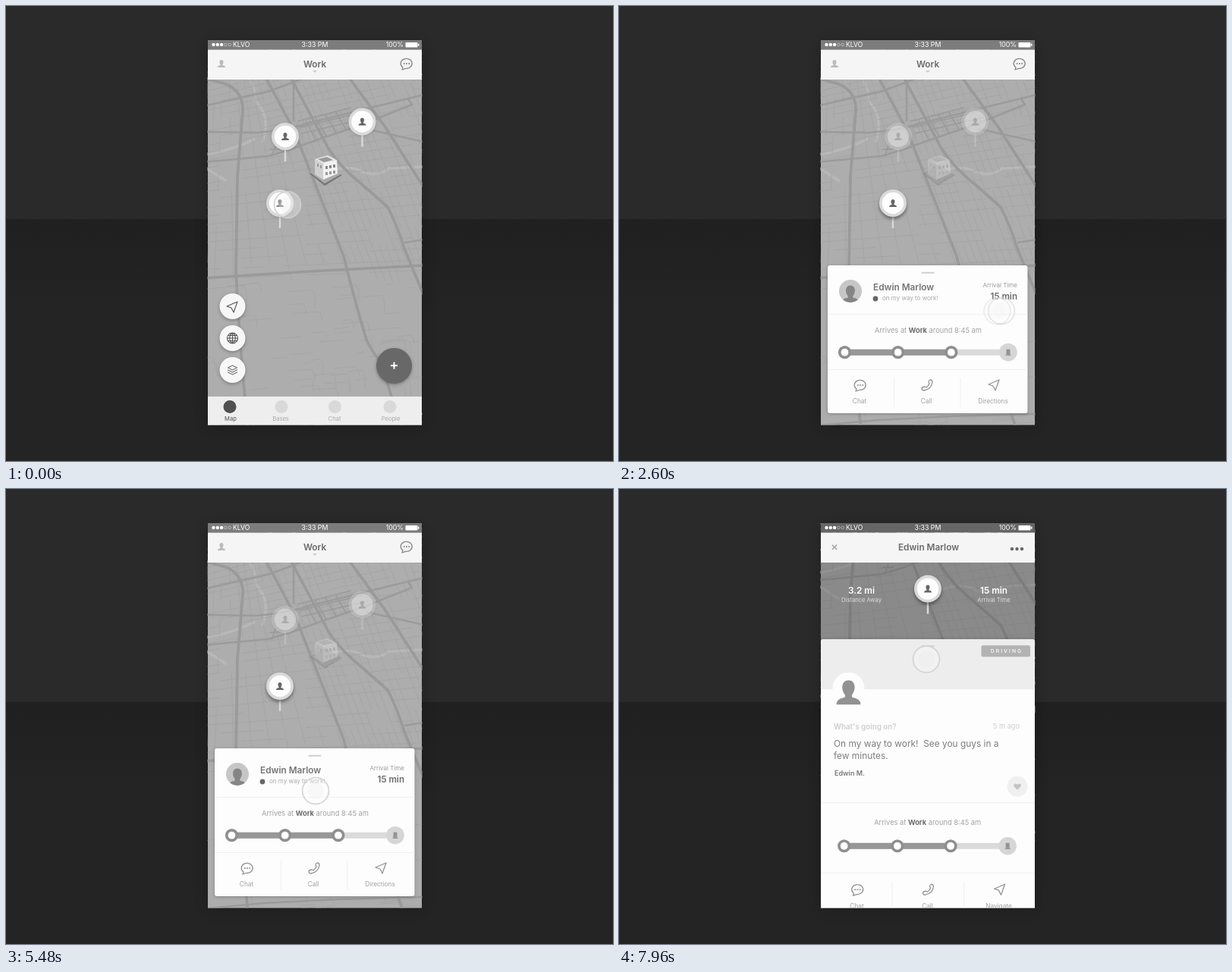
Write an HTML page with a canvas that moves like this. It is 800 px wide and 600 px high and loops after 8 s.

```html
<!DOCTYPE html>
<html lang="en">
<head>
<meta charset="utf-8">
<title>Map app</title>
<style>
html, body { margin: 0; width: 100%; height: 100%; overflow: hidden; background: #242424; }
canvas { display: block; }
</style>
</head>
<body>
<canvas id="stage" width="800" height="600"></canvas>
<script>
const LOOP = 8000, STEP = 40, TAU = Math.PI * 2;
const NAME = 'Edwin Marlow';
const stage = document.getElementById('stage').getContext('2d');
const layer = document.createElement('canvas');
layer.width = 800; layer.height = 600;
const next = layer.getContext('2d');
let g = stage;

// Timing helpers
const clamp = v => Math.max(0, Math.min(1, v));
const mix = (a, b, k) => a + (b - a) * k;
const outQuad = k => 1 - (1 - k) ** 2;
const outCubic = k => 1 - (1 - k) ** 3;
const smooth = k => k * k * (3 - 2 * k);
const ramp = (t, a, b, ease = smooth) => ease(clamp((t - a) / (b - a)));
const gray = v => { v = Math.round(v); return `rgb(${v},${v},${v})`; };
function track(t, keys, ease = smooth) {
  let i = 1;
  while (i < keys.length - 1 && t > keys[i][0]) i++;
  const [a, b] = [keys[i - 1], keys[i]];
  return mix(a[1], b[1], ramp(t, a[0], b[0], ease));
}

// Drawing helpers
function disc(x, y, r, fill) {
  g.fillStyle = fill; g.beginPath(); g.arc(x, y, r, 0, TAU); g.fill();
}
function ring(x, y, r, color, w) {
  g.strokeStyle = color; g.lineWidth = w; g.beginPath(); g.arc(x, y, r, 0, TAU); g.stroke();
}
function rect(x, y, w, h, fill) { g.fillStyle = fill; g.fillRect(x, y, w, h); }
function round(x, y, w, h, r, fill) {
  g.fillStyle = fill; g.beginPath(); g.roundRect(x, y, w, h, r); g.fill();
}
function poly(pts, fill) {
  g.fillStyle = fill; g.beginPath(); pts.forEach(p => g.lineTo(...p)); g.closePath(); g.fill();
}
function text(s, x, y, size, color, align = 'left', weight = 400) {
  g.font = `${weight} ${size}px Inter, Roboto, sans-serif`;
  g.textAlign = align; g.textBaseline = 'middle'; g.fillStyle = color;
  g.fillText(s, x, y);
}
function shape(d, x, y, color, w) {
  g.save(); g.translate(x, y);
  if (w) { g.strokeStyle = color; g.lineWidth = w; g.lineJoin = g.lineCap = 'round'; g.stroke(d); }
  else { g.fillStyle = color; g.fill(d); }
  g.restore();
}
function shadow(color, blur, dy) { g.shadowColor = color; g.shadowBlur = blur; g.shadowOffsetY = dy; }
function noShadow() { g.shadowColor = 'transparent'; }
function fade(a, draw) {
  if (a <= 0.005) return;
  g.save(); g.globalAlpha *= a; draw(); g.restore();
}
function shifted(x, y, draw) { g.save(); g.translate(x, y); draw(); g.restore(); }

const ICON = {
  arrow: new Path2D('M7-7L-7-1L-1 1L2 7Z'),
  phone: new Path2D('M4-7Q7-7 7-4Q6 5-4 7Q-7 7-7 4Q-6 2-3 2L-1 3Q2 1 3-2L2-4Q2-6 4-7Z'),
  bubble: new Path2D('M-5 5A7.5 6.5 0 1 1-1 6.4L-6 8Z'),
  heart: new Path2D('M0 4.5L-4.5 0Q-5.5-3-2.6-3.8Q-.8-4 0-2.2Q.8-4 2.6-3.8Q5.5-3 4.5 0Z'),
  person: new Path2D('M0-5C3-5 3.2-1 1.4 1L1.5 2Q5 2.5 5 5H-5Q-5 2.5-1.5 2L-1.4 1C-3.2-1-3-5 0-5Z'),
  globe: new Path2D('M-7 0A7 7 0 1 1 7 0A7 7 0 1 1-7 0H7M0-7V7M0-7C-5-4-5 4 0 7C5 4 5-4 0-7M-6-3.5H6M-6 3.5H6'),
  layers: new Path2D('M0-6L6-3L0 0L-6-3ZM-6 0L0 3L6 0M-6 3L0 6L6 3')
};
function person(x, y, k, color) { shifted(x, y, () => { g.scale(k, k); shape(ICON.person, 0, 0, color); }); }
function chat(x, y, color) {
  shape(ICON.bubble, x, y, color, 1.3);
  for (const d of [-3.2, 0, 3.2]) disc(x + d, y, 1.1, color);
}

// Street map
let seed = 7;
const rnd = () => (seed = (seed * 16807) % 2147483647) / 2147483647;
const streets = new Path2D();
function street(x1, y1, x2, y2) { streets.moveTo(x1, y1); streets.lineTo(x2, y2); }
for (let y = 70; y < 360; y += 7 + y / 60) {
  const slope = -0.26 + clamp((y - 90) / 260) * 0.22;
  for (let x = 255; x < 550; x += 28)
    if (rnd() < 0.72) street(x, y + (x - 300) * slope, x + 28, y + (x - 272) * slope);
}
for (let k = -10; k < 34; k++) {
  const lean = clamp((k - 2) / 7) * 0.42 - 0.04;
  for (let y = 75; y < 350; y += 24) {
    const x = 266 + k * 9.5 + (y - 97) * lean;
    if (rnd() < 0.68) street(x, y, x + 24 * lean, y + 24);
  }
}
for (let i = 0; i < 75; i++) {
  const x = 262 + rnd() * 280, y = 365 + rnd() * 190, w = 8 + rnd() * 26, h = 8 + rnd() * 18;
  streets.moveTo(x, y); streets.lineTo(x + w, y - 2);
  if (rnd() < 0.6) streets.quadraticCurveTo(x + w + 5, y + 2, x + w + 4, y + h);
}
for (let i = 0; i < 10; i++) street(384 + i * 7, 151 - i * 1.8, 394 + i * 7, 180 - i * 2.4);
const block = new Path2D('M384 152L455 134M387 160L470 140M390 168L480 147M395 151L408 176M408 147L422 172M421 143L435 168M435 140L448 163M348 189H362M355 184L350 199');
const roads = new Path2D('M258 94L290 103Q313 113 312 138L305 225L303 350Q308 450 319 560M332 75L380 165L445 330Q460 390 475 440Q482 455 494 470L508 515L525 560M365 75L425 188Q440 212 470 236L503 265Q516 290 525 320L550 380M438 75L500 160L550 238M260 359L400 350L550 342');
const lanes = new Path2D('M260 132L345 113L420 85M260 166L330 167Q370 164 400 154L550 117M260 206L345 198Q375 190 400 180L470 156L535 130L530 123M379 85V152M525 312L550 308M474 162L550 179M266 553L340 546L440 541L550 538');
const rivers = new Path2D('M318 92Q330 108 328 125Q350 145 338 180M262 196Q300 190 328 175M264 214L291 231M426 218Q450 210 464 216Q488 228 505 214L550 212');
function line(path, color, w) { g.strokeStyle = color; g.lineWidth = w; g.lineJoin = 'round'; g.stroke(path); }
function map(shift, dark) {
  rect(266, 97, 282, 456, '#adadad');
  shifted(0, shift, () => {
    line(rivers, '#b8b8b8', 3.4);
    line(streets, '#a2a2a2', 0.7);
    line(block, '#9a9a9a', 1.6);
    line(lanes, '#9b9b9b', 2.5);
    line(roads, '#9a9a9a', 3.7);
  });
  rect(266, 97, 282, 456, `rgba(45,45,48,${0.29 * dark})`);
}
function building() {
  poly([[400, 221], [421, 209], [443, 223], [420, 237]], '#777');
  poly([[400, 219], [421, 207], [443, 221], [420, 234]], '#aaa');
  poly([[407, 202], [418, 207], [418, 229], [407, 222]], '#cfcfcf');
  poly([[418, 207], [436, 203], [437, 221], [418, 229]], '#f1f1f1');
  poly([[407, 202], [424, 197], [436, 203], [418, 208]], '#e6e6e6');
  poly([[411, 202], [423, 199], [431, 203], [419, 206]], '#999');
  for (let i = 0; i < 3; i++) {
    rect(421 + i * 5, 211 - i, 3, 4, '#888');
    rect(421 + i * 5, 219 - i, 3, 4, '#999');
  }
  rect(410, 208, 2, 4, '#999'); rect(414, 210, 2, 4, '#999');
}
function pin(x, y, a, lit) {
  fade(a, () => {
    rect(x - 1.2, y + 16, 2.4, 17, '#dadada');
    shadow(`rgba(0,0,0,${0.15 + 0.25 * lit})`, 4, 1 + 2 * lit);
    disc(x, y, 18, '#dadada');
    noShadow();
    disc(x, y, 14.2, '#fdfdfd');
    person(x, y, 1, '#666');
  });
}

// Interface pieces
function controls(a) {
  fade(a, () => {
    shadow('rgba(0,0,0,.3)', 4, 1.5);
    for (const y of [396, 438, 480]) disc(298.5, y, 17, '#f7f7f7');
    disc(511.5, 474.5, 23.5, '#686868');
    noShadow();
    shape(ICON.arrow, 298, 397, '#555', 1.1);
    shape(ICON.globe, 298.5, 438, '#555', 1.1);
    shape(ICON.layers, 298.5, 480, '#777', 1.2);
    rect(507, 473.2, 9, 2, '#fff'); rect(510.5, 469.7, 2, 9, '#fff');
  });
}
function tabs(drop) {
  if (drop >= 38) return;
  shifted(0, drop, () => {
    rect(266, 515, 282, 40, '#eee');
    ['Map', 'Bases', 'Chat', 'People'].forEach((s, i) => {
      disc([295, 363, 433.5, 506][i], 528.5, 8.5, i ? '#d9d9d9' : '#505050');
      text(s, [296, 362, 433, 507][i], 545, 7.6, i ? '#aaa' : '#555', 'center');
    });
  });
}
function header(p) {
  rect(266, 45, 282, 12.5, gray(mix(124, 101, p)));
  for (let i = 0; i < 5; i++)
    i < 3 ? disc(273.5 + i * 5.3, 51, 2.2, '#fff') : ring(273.5 + i * 5.3, 51, 1.8, 'rgba(255,255,255,.6)', 0.7);
  text('KLVO', 299, 51.3, 8.6, '#fff');
  text('3:33 PM', 407, 51.3, 8.8, '#fff', 'center');
  text('100%', 524, 51.3, 8.8, '#fff', 'right');
  round(526.5, 48, 16, 6.5, 1, '#fff'); rect(543, 49.7, 1.5, 3, '#fff');
  rect(266, 57.5, 282, 39.5, '#f5f5f5');
  const q = clamp(p / 0.88);
  fade(1 - q, () => {
    person(284, 76, 1, '#bbb');
    text('Work', 407, 77.5, 11.8, '#6a6a6a', 'center', 600);
    poly([[404, 85], [410, 85], [407, 88]], '#ccc');
    chat(528, 76, '#888');
  });
  fade(q, () => {
    text('×', 284, 76.5, 15, '#aaa', 'center', 600);
    text(NAME, 408, 77.5, 11.8, '#6a6a6a', 'center', 600);
    for (const x of [518, 524.5, 531]) disc(x, 79, 2.2, '#666');
  });
}
function avatar(x, y, r, bg, color) {
  disc(x, y, r, bg);
  g.save(); g.beginPath(); g.arc(x, y, r, 0, TAU); g.clip();
  person(x, y + r * 0.27, r * 0.155, color);
  g.restore();
}
function actions(xs, y, labels, divs, h) {
  chat(xs[0], y, '#929292');
  shape(ICON.phone, xs[1], y, '#929292', 1.3);
  shape(ICON.arrow, xs[2], y, '#929292', 1.3);
  labels.forEach((s, i) => text(s, xs[i] - 1, y + 22, 8.3, '#a0a0a0', 'center'));
  for (const x of divs) rect(x, y - 10, 1, h, '#f0f0f0');
}
function arrives(y) {
  const parts = [['Arrives at ', 400, '#a2a2a2'], ['Work', 700, '#6c6c6c'], [' around 8:45 am', 400, '#a2a2a2']];
  let x = 337;
  for (const [s, weight, color] of parts) {
    text(s, x, y, 9.3, color, 'left', weight);
    x += g.measureText(s).width;
  }
}
function goal(x, y) {
  disc(x, y, 11.8, '#d6d6d6');
  rect(x - 2.5, y - 4, 5, 7, '#939393'); rect(x - 3.5, y + 3, 7, 1.3, '#939393');
}
function stops(y, k) {
  if (k <= 0) return;
  fade(clamp(k * 3), () => {
    round(297, y - 4, 216, 8, 4, '#dadada');
    round(297, y - 4, 141 * k, 8, 4, '#979797');
    [0, 0.5, 1].forEach((at, i) => {
      const s = clamp((k - at * 0.8) * 5);
      disc(297.5 + i * 70.2, y, 8.6 * s, '#8f8f8f');
      disc(297.5 + i * 70.2, y, 4.9 * s, '#fff');
    });
    goal(513, y);
  });
}
function card(grow, eta) {
  shadow('rgba(0,0,0,.25)', 4, 1);
  round(275, 342, 263.5, 195, 3, '#fdfdfd');
  noShadow();
  round(398.5, 350.8, 17, 2, 1, '#cfcfcf');
  avatar(305, 376, 15, eta ? '#d8d8d8' : '#c6c6c6', '#858585');
  text(NAME, 335, 371, 11.8, '#747474', 'left', 600);
  disc(338, 386, 3.4, '#666');
  text('on my way to work!', 347, 386, 8, '#aaa');
  text(eta ? 'ETA' : 'Arrival Time', 525, 368.5, 8, '#9b9b9b', 'right');
  text('15 min', 525, 384, 11.6, '#6c6c6c', 'right', 600);
  rect(275, 406, 263.5, 1, '#f1f1f1');
  if (eta) {
    round(298, 435, 216, 8, 4, '#dadada');
    round(298, 435, 134.5 * grow, 8, 4, '#939393');
    disc(298.5, 439, 8.8, '#787878');
    poly([[294, 439], [298.5, 434.5], [303, 439], [301.5, 439], [301.5, 443], [295.5, 443], [295.5, 439]], '#c4c4c4');
    goal(513.5, 439);
    text('Arrive around 8:45 am', 407, 460, 8.2, '#9b9b9b', 'center');
  } else {
    arrives(428);
    stops(456.7, grow);
  }
  rect(275, 479, 263.5, 1, '#f1f1f1');
  actions([318, 406, 494], 500, ['Chat', 'Call', 'Directions'], [362, 449.5], 39);
}
function sheet(top) {
  shifted(0, top, () => {
    shadow('rgba(0,0,0,.25)', 4, 0);
    round(266, 0, 282, 400, [3, 3, 0, 0], '#fdfdfd');
    noShadow();
    round(266, 0, 282, 66, [3, 3, 0, 0], '#ededed');
    round(398.5, 8, 17, 1.8, 1, '#cfcfcf');
    round(477.5, 8, 64.5, 15, 2, '#b3b3b3');
    g.letterSpacing = '2px';
    text('DRIVING', 511, 16, 6.8, '#f4f4f4', 'center', 600);
    g.letterSpacing = '0px';
    disc(302.5, 64.5, 21, '#fdfdfd');
    person(302.5, 70, 3.2, '#929292');
    text("What's going on?", 283, 116, 9.8, '#cecece', 'left', 600);
    text('5 m ago', 528, 115, 9.2, '#cecece', 'right');
    text('On my way to work!  See you guys in a', 283, 138, 11.9, '#7c7c7c');
    text('few minutes.', 283, 154, 11.9, '#7c7c7c');
    text('Edwin M.', 284, 177, 9, '#777', 'left', 600);
    disc(525, 194, 13.5, '#f0f0f0');
    shape(ICON.heart, 525, 194, '#c4c4c4');
    rect(266, 215, 282, 1, '#f1f1f1');
    shifted(-0.8, 0, () => { arrives(242); stops(272.5, 1); });
    rect(266, 307.5, 282, 1, '#f1f1f1');
    actions([314.5, 407.5, 501.5], 330, ['Chat', 'Call', 'Navigate'], [359.5, 454], 50);
  });
}
function stats(p) {
  const d = Math.max(0, 0.95 - p);
  fade(clamp((p - 0.55) / 0.38), () => {
    [['3.2 mi', 'Distance Away', 319.5 + d * 84], ['15 min', 'Arrival Time', 494 - d * 76]].forEach(([a, b, x]) => {
      text(a, x, 134.5 + d * 75, 11.8, '#fff', 'center', 600);
      text(b, x, 147 + d * 62, 7.6, '#ddd', 'center');
    });
  });
}
function touch(t) {
  const x = track(t, [[0, 371], [900, 364], [1500, 364], [1700, 504], [2600, 504], [3000, 308], [3700, 308], [4320, 519], [4700, 519], [4900, 408], [5500, 408], [6100, 411], [6700, 411], [7000, 405]]);
  const y = track(t, [[0, 262], [1500, 263], [1700, 402], [2600, 402], [3000, 414], [3700, 414], [4320, 412], [4700, 412], [4900, 398], [5650, 398], [6060, 338], [6700, 338], [7000, 206], [7660, 206], [7960, 224.5]]);
  const a = track(t, [[0, 1], [1100, 1], [1360, 0], [2150, 0], [2400, 1], [3000, 1], [3180, 0], [3350, 0], [3550, 1], [4400, 1], [4650, 0], [5250, 0], [5500, 1], [6200, 1], [6450, 0], [7560, 0], [7680, 1]]);
  fade(a, () => {
    disc(x, y, 18, 'rgba(250,250,250,.3)');
    disc(x, y, 11, 'rgba(225,225,225,.22)');
    ring(x, y, 17.4, 'rgba(208,208,208,.85)', 1.8);
  });
}

function backdrop() {
  rect(0, 0, 800, 281, '#2a2a2a');
  const low = g.createLinearGradient(0, 281, 0, 405);
  low.addColorStop(0, '#202020'); low.addColorStop(1, '#242424');
  rect(0, 281, 800, 319, low);
  shadow('rgba(0,0,0,.22)', 22, 3);
  rect(266, 45, 282, 507, '#222');
  noShadow();
}

function scene(ctx, t) {
  g = ctx;
  backdrop();
  g.save();
  g.beginPath(); g.rect(265.5, 45, 283, 507.5); g.clip();

  const open = ramp(t, 5900, 6600, outCubic) - 0.049 * ramp(t, 7660, 7960);
  const rise = ramp(t, 1050, 1240, outQuad);
  const slide = track(t, [[2640, 0], [3020, -271], [3680, -271], [3760, -264.5], [4320, -1], [4420, 0]]);
  const away = ramp(t, 2840, 3040) - ramp(t, 3960, 4160);
  const dim = ramp(t, 960, 1200), dimLate = ramp(t, 1080, 1440);
  const gone = 1 - clamp(open * 1.12);

  map(-90 * open, open);
  fade((1 - 0.66 * dim) * gone, building);
  pin(469.5, 152.5, (1 - 0.66 * dimLate) * gone, 0);
  pin(368, 172, (1 - 0.66 * dim * (1 - away)) * gone, away);
  pin(361 + 46 * clamp(open / 0.7), 260 - 135 * open, 1 - 0.66 * away, dim * (1 - away));
  stats(open);
  controls(1 - ramp(t, 860, 1080));
  tabs(40 * ramp(t, 860, 1100));

  if (open > 0) sheet(552 - 372 * open);
  if (rise > 0 && open < 0.93) {
    shifted(0, 215 * (1 - rise) + 231 * open, () => {
      const second = clamp(-slide / 271);
      if (slide > -270.5)
        shifted(slide, 0, () => fade(second > 0.6 ? 1 - 0.5 * (second - 0.6) / 0.4 : 1, () => card(ramp(t, 1300, 1850), false)));
      if (slide < -2)
        shifted(slide + 271, 0, () => fade(0.5 + 0.5 * clamp(second / 0.4), () => card(ramp(t, 2850, 3300), true)));
    });
  }
  header(open);
  touch(t);
  g.restore();
}

// Each step carries a trace of the following one, as in blended video
const start = performance.now();
function frame(now) {
  const t = Math.floor((Math.max(0, now - start) % LOOP) / STEP) * STEP;
  scene(next, Math.min(t + STEP, LOOP - STEP));
  scene(stage, t);
  stage.globalAlpha = 0.4;
  stage.drawImage(layer, 0, 0);
  stage.globalAlpha = 1;
  requestAnimationFrame(frame);
}
frame(start);
</script>
</body>
</html>
```
